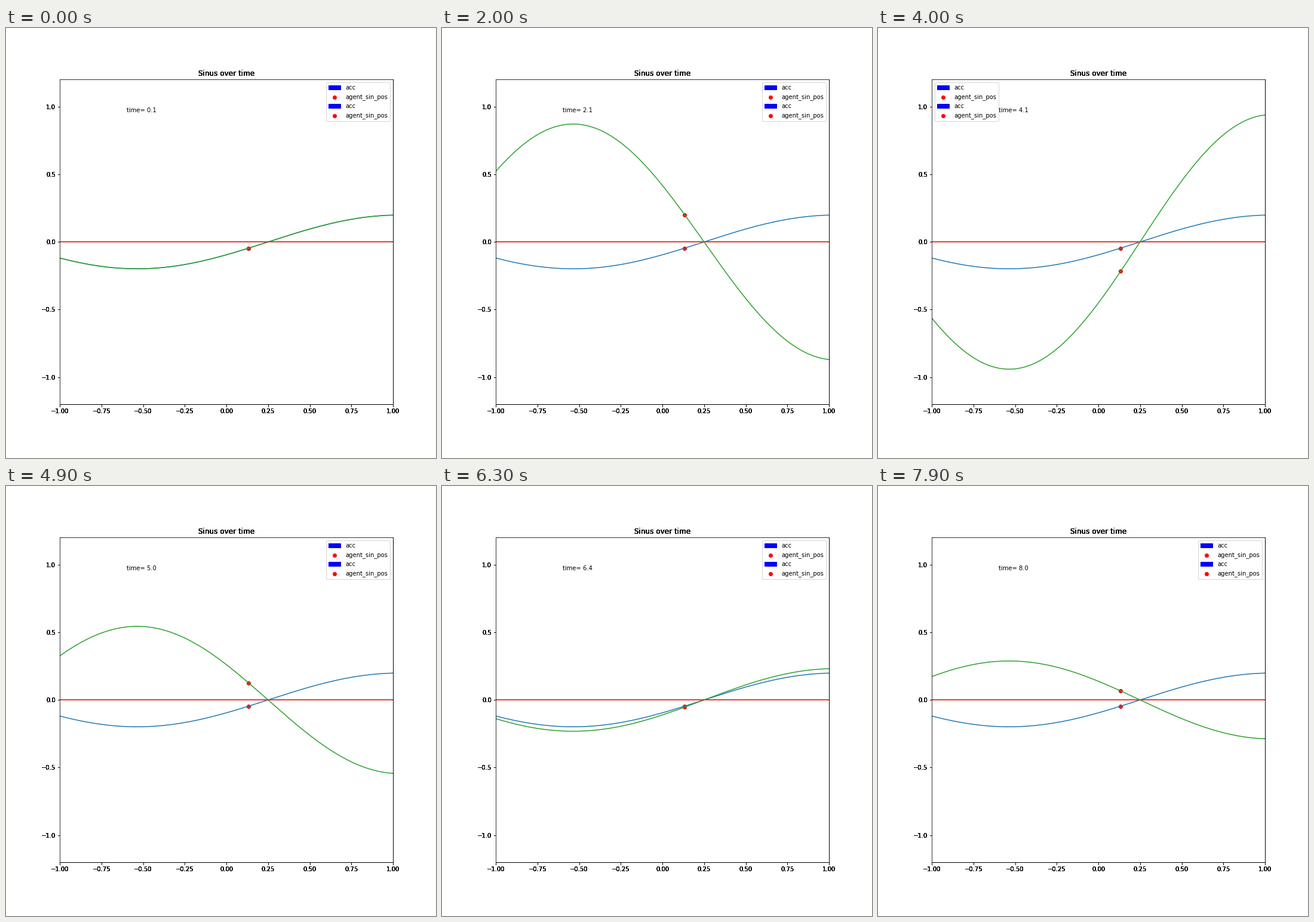
Animation of 720x720 px, one loop 8000 ms. Source, as a matplotlib script:

```python
import numpy as np
import matplotlib.pyplot as plt
from matplotlib.animation import FuncAnimation
from matplotlib.patches import Patch

FRAMES, INTERVAL = 80, 100
LAYERS = 5          # stacked axes that darken the labels
LEGEND_LIMIT = 0.896  # amplitude at which the curve reaches the legend
AGENT_X = 2 / 15

plt.rcParams["font.family"] = "DejaVu Sans"

fig = plt.figure(figsize=(10, 10), dpi=72, facecolor="white")
fig.subplots_adjust(left=0.125, right=0.9, bottom=0.125, top=0.88)


def make_axes():
    ax = fig.add_subplot(111)
    ax.set(xlim=(-1, 1), ylim=(-1.2, 1.2), title="Sinus over time")
    return ax


def wave(x, t):
    return np.sin(2 * t) * np.sin(2 * (x - 0.25))


def draw_state(t):
    """Plot the curve, the zero line and the agent at time t."""
    curve, = ax.plot(x, wave(x, t))
    ax.plot(x, np.zeros_like(x))
    dot = ax.scatter([AGENT_X], [wave(AGENT_X, t)], color="red",
                     label="agent_sin_pos")
    return curve, dot


for _ in range(LAYERS - 1):
    make_axes()
ax = make_axes()

x = np.linspace(-1, 1, 200)
_, start_dot = draw_state(0.1)
curve, dot = draw_state(0.1)
clock = ax.text(0.2, 0.9, "", transform=ax.transAxes)

acc = Patch(color="blue", label="acc")
legend = ax.legend(handles=[acc, start_dot, acc, dot], loc="upper right")


def update(i):
    t = (i + 1) / 10
    curve.set_ydata(wave(x, t))
    dot.set_offsets([[AGENT_X, wave(AGENT_X, t)]])
    clock.set_text(f"time= {t:.1f}")
    blocked = np.sin(2 * t) > LEGEND_LIMIT
    legend.set_loc("upper left" if blocked else "upper right")
    return curve, dot, clock, legend


anim = FuncAnimation(fig, update, frames=FRAMES, interval=INTERVAL,
                     repeat=True, repeat_delay=0, blit=False)
plt.show()
```
